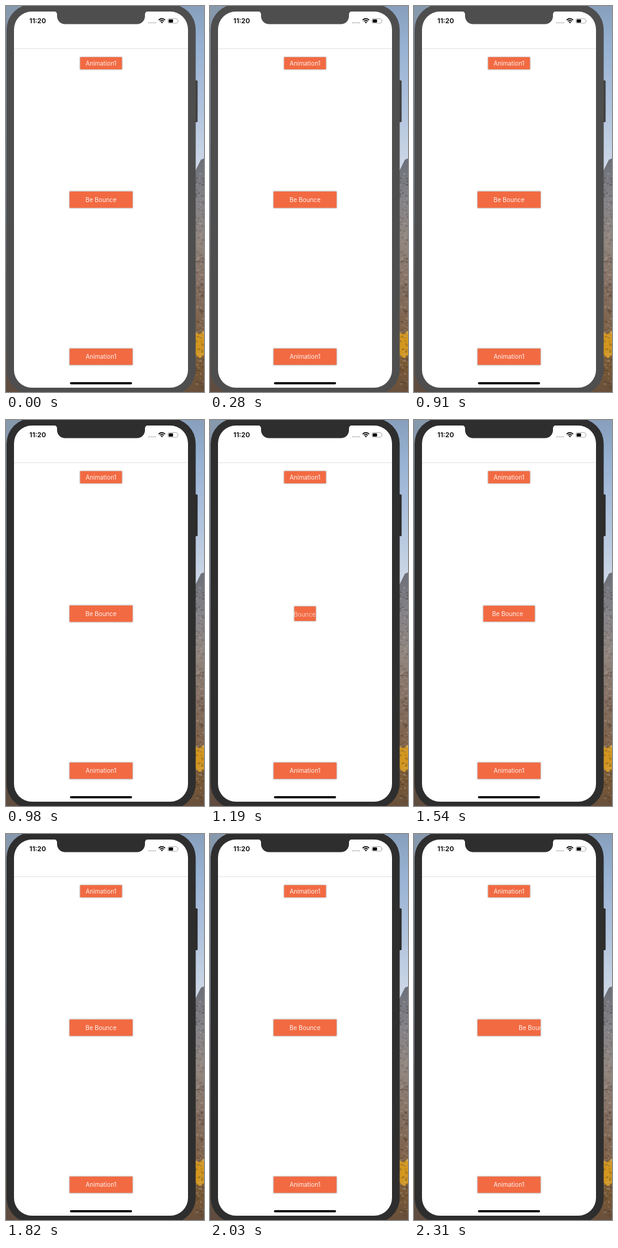
Animation of 322 by 628 pixels, one loop 2.38 s. Source, as an HTML page:

```html
<!DOCTYPE html>
<html lang="en">
<head>
<meta charset="utf-8">
<title>Button bounce</title>
<style>
  html, body { margin: 0; width: 100%; height: 100%; overflow: hidden; background: #fff; }
  svg { display: block; width: 322px; height: 628px; }
  text { font-family: Inter, Roboto, sans-serif; }
  .label { font-size: 9.9px; fill: #fff; fill-opacity: .9; text-anchor: middle; }
  .btn { fill: #f26a42; }
  .shade { fill: #000; opacity: .36; filter: url(#soft); }
</style>
</head>
<body>
<svg viewBox="0 0 322 628" xmlns="http://www.w3.org/2000/svg">
  <defs>
    <linearGradient id="sky" x1="0" y1="0" x2="0" y2="1">
      <stop offset="0" stop-color="#879fbc"/>
      <stop offset=".25" stop-color="#98b2d4"/>
      <stop offset=".65" stop-color="#b3c5de"/>
      <stop offset="1" stop-color="#d0dae8"/>
    </linearGradient>
    <linearGradient id="rock" x1="0" y1="0" x2="0" y2="1">
      <stop offset="0" stop-color="#6c6f78"/>
      <stop offset=".18" stop-color="#85848a"/>
      <stop offset=".35" stop-color="#91867f"/>
      <stop offset=".55" stop-color="#846f62"/>
      <stop offset=".72" stop-color="#80644c"/>
      <stop offset=".88" stop-color="#7a5a35"/>
      <stop offset="1" stop-color="#69503c"/>
    </linearGradient>
    <linearGradient id="edge" x1="0" y1="0" x2="0" y2="1">
      <stop offset="0" stop-color="#8799ad"/>
      <stop offset=".4" stop-color="#71839b"/>
      <stop offset=".7" stop-color="#5a5a5e"/>
      <stop offset="1" stop-color="#604c3e"/>
    </linearGradient>
    <filter id="soft" x="-10%" y="-20%" width="120%" height="140%">
      <feGaussianBlur stdDeviation=".8"/>
    </filter>
    <clipPath id="box"><rect id="boxClip"/></clipPath>
  </defs>

  <rect width="322" height="270" fill="url(#sky)"/>
  <path d="M250 272L308 268L313 258L317 250L322 248V628H250Z" fill="url(#rock)"/>
  <path d="M308 531L314 534L322 528V568L315 573L308 567Z" fill="#d3971f"/>
  <g id="specks"></g>
  <rect width="60" height="628" fill="url(#edge)"/>

  <rect id="side" x="306" y="121" width="5.6" height="68" rx="1.5"/>
  <rect id="body" x="1" y="-3" width="307.5" height="636" rx="41.5"/>
  <rect x="13" y="9" width="283" height="612" rx="29" fill="#fff"/>
  <path id="notch" d="M78 8.5A5 5 0 0 1 83 14V16.5A13 13 0 0 0 96 29.5H213A13 13 0 0 0 226 16.5V14A5 5 0 0 1 231 8.5Z"/>
  <rect x="13" y="69" width="283" height="1" fill="#e2e2e2"/>

  <text x="38" y="28" font-size="11" font-weight="600">11:20</text>
  <g fill="#c4c4c4">
    <circle cx="232.5" cy="27.2" r="1.2"/><circle cx="235.9" cy="27.2" r="1.2"/>
    <circle cx="239.3" cy="27.2" r="1.2"/><circle cx="242.7" cy="27.2" r="1.2"/>
  </g>
  <g fill="none" stroke="#000" stroke-width="1.6">
    <path d="M248.2 22.9Q253.5 18.4 258.8 22.9"/>
    <path d="M250.2 25Q253.5 22.2 256.8 25"/>
  </g>
  <path d="M251.7 26.4Q253.5 25 255.3 26.4L253.5 28.3Z"/>
  <rect x="263.4" y="20.5" width="15.6" height="7.6" rx="2.2" fill="none" stroke="#a5a5a5" stroke-width=".9"/>
  <rect x="264.6" y="21.7" width="7" height="5.2" rx="1"/>
  <path d="M280.2 22.8Q281.7 24.3 280.2 25.8Z" fill="#a5a5a5"/>

  <rect class="shade" x="120.3" y="83" width="68.6" height="20.4"/>
  <rect class="btn" x="120.6" y="83.2" width="67.9" height="19.8"/>
  <text class="label" x="154.5" y="97">Animation1</text>

  <rect id="midShade" class="shade"/>
  <rect id="mid" class="btn"/>
  <g clip-path="url(#box)"><text id="midText" class="label">Be Bounce</text></g>

  <rect class="shade" x="103" y="557" width="103.2" height="27.4"/>
  <rect class="btn" x="103.5" y="557.4" width="102.2" height="26.4"/>
  <text class="label" x="154.5" y="574.3">Animation1</text>

  <rect x="104" y="612" width="101" height="3.5" rx="1.75"/>
</svg>
<script>
const LOOP = 2380, STEP = 70;
const CX = 154.6, CY = 315.1, W = 102.4, H = 26.6;
const wake = 980, growAt = 995, growTime = 805, slideAt = 2030, slideTime = 280;
const $ = id => document.getElementById(id);
const clamp = v => Math.max(0, Math.min(1, v));

function set(el, attrs) {
  for (const k in attrs) el.setAttribute(k, attrs[k]);
}

function place(el, w, h, pad = 0) {
  set(el, {
    x: CX - w / 2 - pad, y: CY - h / 2 - pad,
    width: w + 2 * pad, height: h + 2 * pad
  });
}

// Rough stone and foliage on the mountain strip.
function addSpecks(count) {
  let seed = 7;
  const rnd = () => (seed = seed * 16807 % 2147483647) / 2147483647;
  for (let i = 0; i < count; i++) {
    const speck = document.createElementNS('http://www.w3.org/2000/svg', 'ellipse');
    set(speck, {
      cx: 308 + 14 * rnd(), cy: 272 + 354 * rnd(),
      rx: 1 + 2 * rnd(), ry: .6 + 1.4 * rnd(),
      fill: rnd() < .5 ? '#c9b9ac' : '#33281f', opacity: .12 + .2 * rnd()
    });
    $('specks').append(speck);
  }
}

function draw(t) {
  const shell = t < wake ? '#4e4e4e' : '#2e2e2e';
  set($('body'), { fill: shell });
  set($('notch'), { fill: shell });
  set($('side'), { fill: t < wake ? '#3f3f3f' : '#2b2b2b' });

  // The button springs open from zero width; its title trails the shrink.
  const left = t < growAt ? 0 : Math.pow(1 - clamp((t - growAt) / growTime), 1.5);
  const w = W * (1 - left), h = H - 4.5 * left;
  place($('mid'), w, h);
  place($('boxClip'), w, h);
  place($('midShade'), w, h, .4);

  const slide = 41 * clamp((t - slideAt) / slideTime) ** 2;
  set($('midText'), {
    x: 154.5 - 12 * left + slide,
    y: 318.8 + 2.4 * left,
    opacity: 1 - .4 * clamp(left * 1.5 - .3)
  });
}

addSpecks(220);
const start = performance.now();
function tick() {
  const t = (performance.now() - start) % LOOP;
  draw(Math.floor(t / STEP) * STEP);
  requestAnimationFrame(tick);
}
draw(0);
requestAnimationFrame(tick);
</script>
</body>
</html>
```
